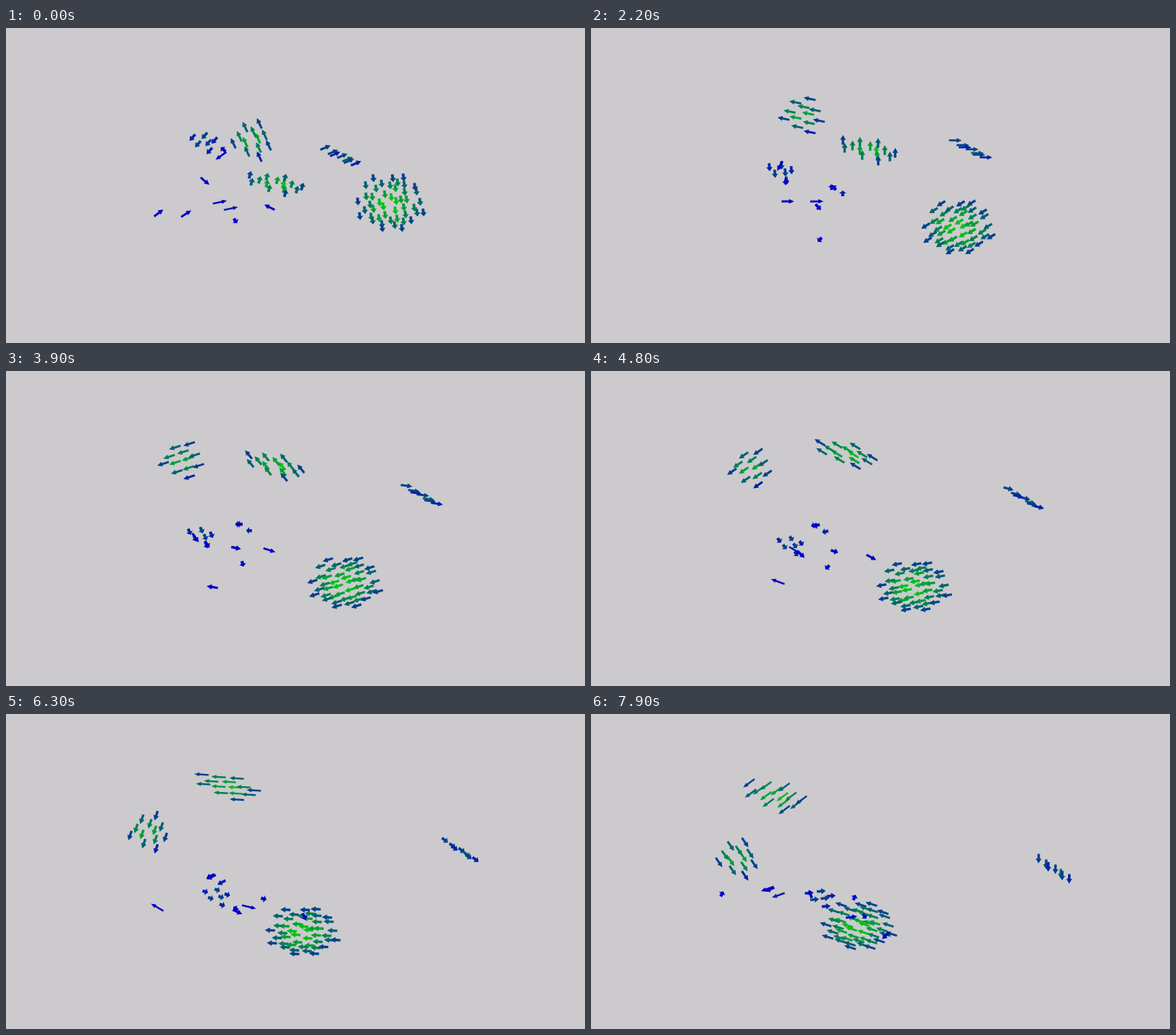
Write an HTML page with a canvas that moves like this. It is 800 by 436 pixels and loops after 8 s.

```html
<!DOCTYPE html>
<html lang="en">
<head>
<meta charset="utf-8">
<title>Flocking arrows</title>
<style>
html, body { margin: 0; height: 100%; overflow: hidden; background: #cccacc; }
canvas { display: block; }
</style>
</head>
<body>
<canvas id="stage" width="800" height="436"></canvas>
<script>
const ctx = document.getElementById('stage').getContext('2d');
const LOOP = 8, STEP = .1;
const TIMES = [0, 2.2, 3.9, 5.7, 7.9];   // when a flock passes its path points
const GOLDEN = Math.PI * (3 - Math.sqrt(5));

// path: the flock's centre as x, y pairs
// rx, ry, tilt: half width, half height and slope of the cloud
// tall: vertical stretch at the start and at the end
const flocks = [
  { count: 6, rx: 18, ry: 15, tilt: .3, path: [273,158, 262,199, 269,229, 284,249, 317,254] },
  { count: 12, rx: 29, ry: 24, tilt: .1, path: [340,153, 292,119, 243,122, 204,149, 203,199] },
  { count: 14, rx: 40, ry: 16, tilt: .25, tall: [.75, 1.1], path: [373,215, 384,168, 371,130, 326,103, 254,113] },
  { count: 7, rx: 27, ry: 2, tilt: .62, tall: [.85, 1.1], path: [463,177, 525,168, 575,172, 618,183, 640,215] },
  { count: 46, rx: 47, ry: 36, tilt: 0, tall: [1.12, .95], path: [531,242, 507,276, 468,293, 424,301, 369,293] },
  { count: 2, rx: 12, ry: 0, tilt: .57, path: [304,246, 341,225, 329,217, 302,224, 252,247] },
  { path: [211,256, 272,240, 318,245, 350,254, 364,254] },
  { path: [249,257, 312,240, 364,248, 405,271, 407,307] },
  { path: [275,212, 314,248, 327,267, 322,272, 303,249] },
  { path: [317,267, 316,293, 285,299, 228,278, 181,249] },
  { path: [364,248, 336,221, 323,212, 296,220, 247,243] },
  { path: [297,177, 269,213, 278,240, 307,267, 360,281] },
  { path: [300,168, 261,191, 262,231, 313,261, 378,280] }
];

// Repeatable noise from -1 to 1
const noise = n => 2 * (Math.abs(Math.sin(n * 12.9898) * 43758.5453) % 1) - 1;

// Spiral cloud with a little jitter; inner members have more neighbours and so are greener
function scatter({ count = 1, rx = 0, ry = 0, tilt = 0 }) {
  const peak = Math.min(6, count * .42);
  return Array.from({ length: count }, (_, i) => {
    const r = Math.sqrt((i + .5) / count), a = i * GOLDEN;
    const dx = rx * (r * Math.cos(a) + .08 * noise(i + 1));
    const dy = ry * (r * Math.sin(a) + .08 * noise(i + 91)) + tilt * dx;
    return { dx, dy, level: Math.round(peak * (1 - .75 * r * r)) };
  });
}
for (const flock of flocks) flock.members = scatter(flock);

// The smooth curve (Lagrange polynomial) through the path points
function position(path, t) {
  let x = 0, y = 0;
  TIMES.forEach((ti, i) => {
    const weight = TIMES.reduce((w, tj) => tj === ti ? w : w * (t - tj) / (ti - tj), 1);
    x += weight * path[2 * i];
    y += weight * path[2 * i + 1];
  });
  return [x, y];
}

function arrow(x, y, angle, length, level) {
  const tip = length / 2, wide = Math.max(2.7, 6.4 - .18 * length), narrow = wide * .43;
  const neck = tip - Math.min(7, length * .5);
  ctx.save();
  ctx.translate(x, y);
  ctx.rotate(angle);
  ctx.fillStyle = `rgb(0,${32 * level},${200 - 29 * level})`;
  ctx.beginPath();
  ctx.moveTo(-tip, -narrow);
  ctx.lineTo(neck, -narrow);
  ctx.lineTo(neck, -wide);
  ctx.lineTo(tip, 0);
  ctx.lineTo(neck, wide);
  ctx.lineTo(neck, narrow);
  ctx.lineTo(-tip, narrow);
  ctx.fill();
  ctx.restore();
}

function draw(seconds) {
  const t = Math.floor(seconds / STEP) % Math.round(LOOP / STEP) * STEP;
  ctx.fillStyle = '#cccacc';
  ctx.fillRect(0, 0, 800, 436);
  for (const { path, members, tall: [from, to] = [1, 1] } of flocks) {
    const [x, y] = position(path, t);
    const [x0, y0] = position(path, t - .01), [x1, y1] = position(path, t + .01);
    const vx = (x1 - x0) / .02, vy = (y1 - y0) / .02;
    // Arrows show the velocity; seen end-on they shrink to a stub
    const length = Math.min(20, Math.max(8, .58 * Math.hypot(vx, vy)));
    const stretch = from + (to - from) * t / LOOP;
    for (const { dx, dy, level } of members)
      arrow(x + dx, y + dy * stretch, Math.atan2(vy, vx), length, level);
  }
}

const start = performance.now();
function tick() {
  draw((performance.now() - start) / 1000);
  requestAnimationFrame(tick);
}
tick();
</script>
</body>
</html>
```
